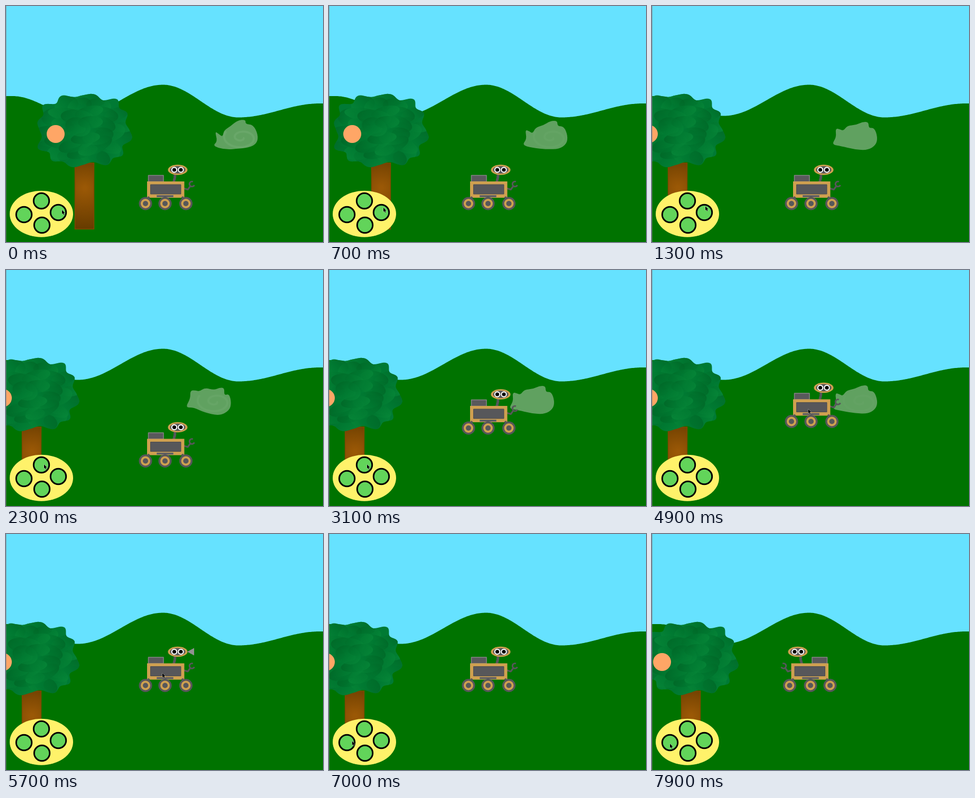
An HTML page with a canvas for the animation above (8000 ms loop, 600x448 px).

```html
<!DOCTYPE html>
<html>
<head>
<meta charset="utf-8">
<style>
html, body { margin: 0; width: 100%; height: 100%; overflow: hidden; background: #007300; }
canvas { display: block; }
</style>
</head>
<body>
<canvas id="stage" width="600" height="448"></canvas>
<script>
const ctx = document.getElementById('stage').getContext('2d');
const LOOP = 8000;
const TAN = '#cfa050', GREY = '#57575a';

const mix = (a, b, k) => a + (b - a) * k;
const clamp = k => Math.min(1, Math.max(0, k));
const ease = k => (1 - Math.cos(Math.PI * clamp(k))) / 2;
// Presses of a button made by time t, at a steady pace.
const presses = (t, first, gap, max) =>
  Math.min(max, Math.max(0, Math.floor((t - first) / gap) + 1));

// Eases between rows of [position, ...values].
function track(rows, t) {
  let i = 0;
  while (i < rows.length - 2 && t >= rows[i + 1][0]) i++;
  const [a, b] = [rows[i], rows[i + 1]];
  const k = ease((t - a[0]) / (b[0] - a[0]));
  return a.slice(1).map((v, n) => mix(v, b[n + 1], k));
}

function seeded(seed) {
  return () => (seed = seed * 16807 % 2147483647) / 2147483647;
}

function paint(fill, stroke, width = 1) {
  if (fill) { ctx.fillStyle = fill; ctx.fill(); }
  if (stroke) { ctx.strokeStyle = stroke; ctx.lineWidth = width; ctx.stroke(); }
}

function ellipse(x, y, rx, ry, ...style) {
  ctx.beginPath();
  ctx.ellipse(x, y, rx, ry, 0, 0, Math.PI * 2);
  paint(...style);
}

const disc = (x, y, r, ...style) => ellipse(x, y, r, r, ...style);

function rect(x, y, w, h, ...style) {
  ctx.beginPath();
  ctx.rect(x, y, w, h);
  paint(...style);
}

function line(points, color, width) {
  ctx.beginPath();
  points.forEach(p => ctx.lineTo(...p));
  paint(null, color, width);
}

// Smooth closed outline through the midpoints of a polygon.
function blob(points) {
  const n = points.length;
  const mid = i => [0, 1].map(d => mix(points[i % n][d], points[(i + 1) % n][d], .5));
  ctx.beginPath();
  ctx.moveTo(...mid(n - 1));
  for (let i = 0; i < n; i++) ctx.quadraticCurveTo(...points[i], ...mid(i));
  ctx.closePath();
}

const ridge = [[12, 171], [136, 208.5], [297, 149.5], [440, 211.5], [594, 185]];

function drawLand() {
  rect(0, 0, 600, 448, '#66e2ff');
  ctx.beginPath();
  ctx.moveTo(0, 448);
  for (let x = 0; x <= 600; x += 2) ctx.lineTo(x, track(ridge, x)[0]);
  ctx.lineTo(600, 448);
  paint('#007300');
}

function crownPath() {
  ctx.beginPath();
  for (let a = 0; a < Math.PI * 2; a += .03) {
    const r = 1 + .06 * Math.sin(12 * a) + .025 * Math.sin(7 * a + 1);
    const side = v => Math.sign(v) * Math.abs(v) ** .78 * r;
    ctx.lineTo(147 + 85 * side(Math.cos(a)), 236 + 66 * side(Math.sin(a)));
  }
  ctx.closePath();
}

function drawLeaves() {
  const rnd = seeded(41);
  for (let i = 0; i < 34; i++) {
    const a = i * 2.4, d = Math.sqrt(1 - i / 34);
    const w = 22 + 14 * rnd(), h = 11 + 7 * rnd();
    ctx.save();
    ctx.translate(147 + 80 * d * Math.cos(a), 236 + 62 * d * Math.sin(a));
    ctx.rotate(rnd() * .9 - .45);
    const dir = rnd() < .5 ? -1 : 1;
    const g = ctx.createLinearGradient(-w * dir, -h, w * dir, h);
    g.addColorStop(0, 'rgba(0,98,36,.75)');
    g.addColorStop(.5, 'rgba(0,120,48,.7)');
    g.addColorStop(1, 'rgba(8,138,58,.75)');
    ellipse(0, 0, w, h, g);
    ctx.restore();
  }
}

function drawTree(x) {
  ctx.save();
  ctx.translate(x, 0);
  const bark = ctx.createRadialGradient(149, 345, 3, 149, 352, 70);
  bark.addColorStop(0, '#9a5806');
  bark.addColorStop(1, '#683c00');
  rect(130.5, 298, 36, 125.5, bark, '#7d4a00', 1.5);
  ctx.save();
  crownPath();
  paint('#007a34');
  ctx.clip();
  drawLeaves();
  ctx.restore();
  disc(94, 243, 17, '#ffa666');
  ctx.restore();
}

const puff = [[397, 232], [406, 234], [412, 237], [420, 227], [436, 226], [448, 220], [460, 220],
  [460, 232], [471, 231], [477, 249], [474, 264], [458, 274], [432, 272], [408, 266],
  [390, 263], [399, 249]];

// Rotates a point about the cloud's middle, more strongly the nearer it is.
function whirl([x, y], turn) {
  const dx = x - 435, dy = y - 247;
  const r = Math.hypot(dx, dy);
  const a = Math.atan2(dy, dx) + turn * clamp(1 - r / 60) ** 2;
  return [435 + r * Math.cos(a), 247 + r * Math.sin(a)];
}

function drawCloud(x, t) {
  const [turn] = track([[0, -1.4], [1300, 0], [2300, .9], [3100, 0], [4000, .9], [5500, -.9]], t);
  ctx.save();
  ctx.translate(x, 0);
  blob(puff.map(p => whirl(p, turn)));
  paint('rgba(200,212,200,.48)');
  ctx.clip();
  ctx.beginPath();
  for (let a = 0; a < 10; a += .2) {
    const r = 2 + a * 2.6;
    ctx.lineTo(446 + Math.cos(a) * r * 1.25, 250 + Math.sin(a) * r * .8);
  }
  paint(null, `rgba(225,235,225,${.05 * Math.abs(turn)})`, 4);
  ctx.restore();
}

function drawNozzle() {
  ctx.beginPath();
  ctx.moveTo(343, 311);
  ctx.lineTo(356, 304);
  ctx.lineTo(356, 318);
  ctx.closePath();
  paint('#8c8c8c');
  ctx.clip();
  for (let x = 346; x < 357; x += 3)
    for (let y = 304; y < 318; y += 3) rect(x, y, 1, 1, '#bcbcbc');
}

function drawRobot(y, flipped, nozzle) {
  ctx.save();
  if (flipped) {
    ctx.translate(601, 0);
    ctx.scale(-1, 1);
  }
  ctx.translate(0, y);
  ctx.lineJoin = 'round';

  // Arm, claw and neck
  line([[336, 346], [344, 348.5], [349.5, 341]], GREY, 3.2);
  ctx.beginPath();
  ctx.arc(352, 338, 4.8, .4, 5.1);
  paint(null, GREY, 3);
  line([[320, 319], [319.5, 326], [317.5, 334]], GREY, 5);

  rect(269.5, 321.5, 28.5, 12, '#59595c', '#858585', 1.5);
  rect(267, 333, 70.5, 31, TAN);
  rect(273.5, 339, 57.5, 18, GREY, '#4c4c4e');
  rect(285.5, 359.5, 31, 3, GREY, '#707072');

  for (const x of [264, 301, 340.5]) {
    line([[x, 375], [mix(x, 301, .18), 362]], GREY, 4);
    disc(x, 375, 12.5, GREY);
    disc(x, 375, 9, TAN);
    disc(x, 375, 5, GREY);
  }

  ellipse(325, 311, 18.5, 9.7, TAN);
  ellipse(325, 311, 14.5, 7, GREY);
  for (const x of [318.5, 331]) {
    disc(x, 311, 5.7, '#fff');
    disc(x, 311, 3.6, '#000');
  }
  if (nozzle) drawNozzle();
  ctx.restore();
}

function drawPanel() {
  ellipse(67, 394.7, 60, 44, '#fff26a');
  for (const [x, y] of [[67, 370], [34, 396], [99, 392], [68, 416]])
    disc(x, y, 14.7, '#62d45a', '#000', 3);
}

const pointer = new Path2D('M0 0V8L1.8 6.4L3.2 9.4L4.5 8.8L3.2 5.9H5.6Z');

function drawPointer(x, y) {
  ctx.save();
  ctx.translate(x, y);
  ctx.strokeStyle = 'rgba(255,255,255,.6)';
  ctx.lineWidth = 1;
  ctx.stroke(pointer);
  ctx.fillStyle = '#000';
  ctx.fill(pointer);
  ctx.restore();
}

const pointerPath = [[0, 106, 387], [1250, 101, 380], [1450, 101, 380], [2050, 72, 369],
  [3400, 72, 369], [3900, 288, 267], [4300, 288, 267], [5000, 296, 264],
  [6300, 296, 264], [7100, 34, 398]];

function draw(t) {
  const right = presses(t, 350, 300, 4);
  const up = presses(t, 2200, 170, 7);
  const left = presses(t, 7500, LOOP, 1);
  drawLand();
  drawTree(25 * (left - right));
  if (t < 5500) drawCloud(-12.5 * right, t);
  drawRobot(-12.5 * up, left > 0, t >= 5100 && t < 6300);
  drawPanel();
  rect(0, 0, 1, 448, 'rgba(120,120,120,.5)');
  drawPointer(...track(pointerPath, t));
}

const start = performance.now();
function tick() {
  draw((performance.now() - start) % LOOP);
  requestAnimationFrame(tick);
}
tick();
</script>
</body>
</html>
```
